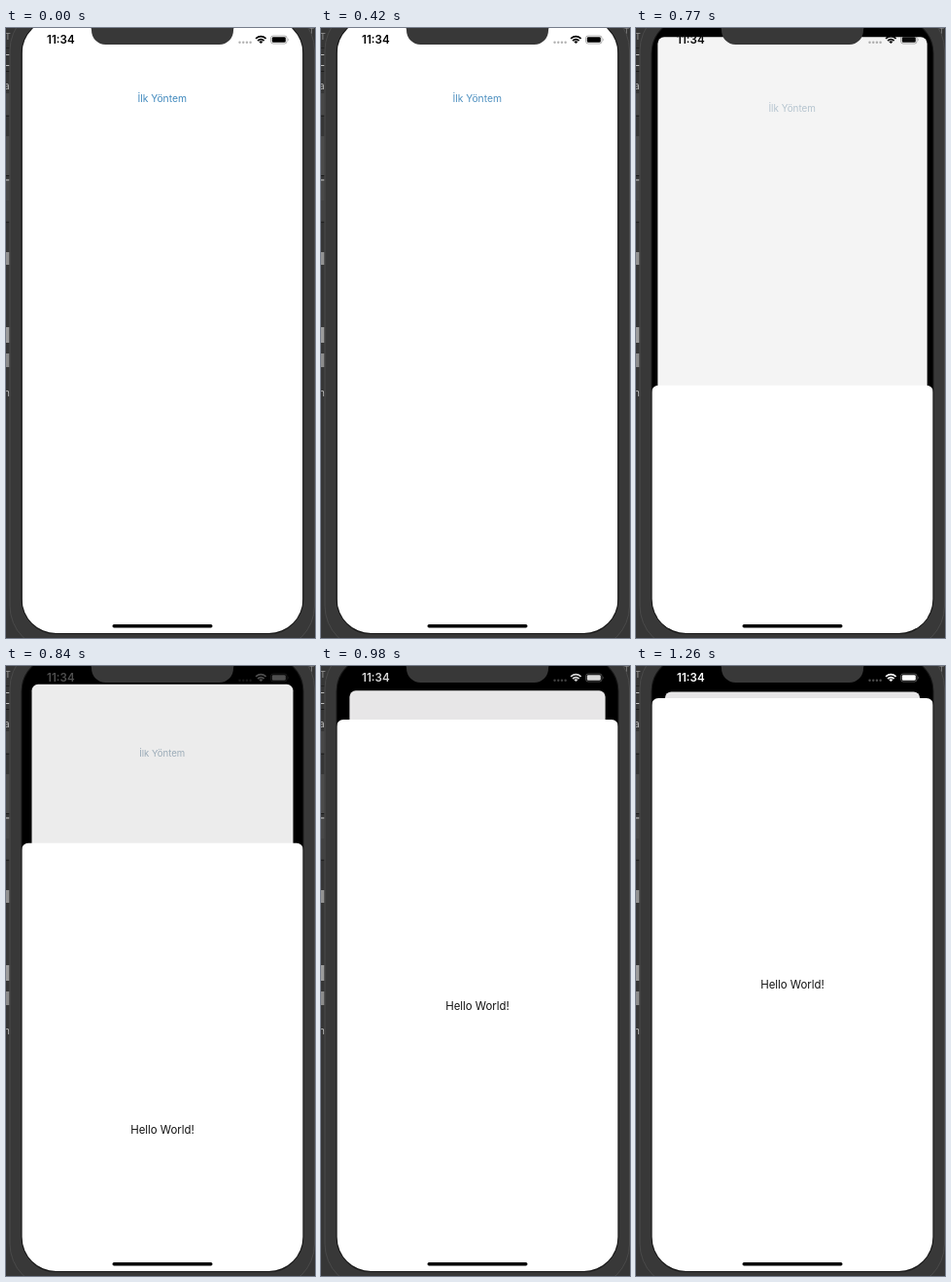
These frames come from a looping animation (318 by 626 pixels, 1.4 s). An HTML page:

```html
<!DOCTYPE html>
<html lang="en">
<head>
<meta charset="utf-8">
<style>
html, body { margin: 0; width: 100%; height: 100%; overflow: hidden; background: #363636; }
svg { display: block; font-family: Inter, "Liberation Sans", sans-serif; }
</style>
</head>
<body>
<svg width="318" height="626" viewBox="0 0 318 626">
  <defs>
    <clipPath id="glass"><rect x="16.6" y="-9" width="288.8" height="630" rx="35"/></clipPath>
  </defs>

  <!-- desktop behind the phone -->
  <g id="desk">
    <rect width="318" height="626" fill="#363636"/>
    <text x="-1" y="12" font-size="9" fill="#999">T</text>
    <text x="-2" y="63" font-size="10" fill="#bbb">a</text>
    <text x="-2" y="378" font-size="10" fill="#bbb">n</text>
    <text x="312" y="6" font-size="8" fill="#888">T</text>
  </g>

  <!-- phone body -->
  <rect x="4" y="-22" width="313.5" height="660" rx="45" fill="#383838" stroke="#4a4a4a"/>
  <rect x="16.6" y="-9" width="288.8" height="630" rx="35" stroke="#161616" stroke-width="2"/>

  <g clip-path="url(#glass)">
    <rect width="318" height="626" fill="#000"/>
    <g id="card">
      <rect id="page" x="16.6" y="-9" width="288.8" height="632" fill="#fff"/>
      <text id="button" x="160.7" y="75.9" font-size="10.3" text-anchor="middle">İlk Yöntem</text>
    </g>
    <g id="status">
      <text x="42" y="16" font-size="11.6" font-weight="600">11:34</text>
      <g opacity=".3">
        <circle cx="240.5" cy="14.7" r="1.2"/><circle cx="244.2" cy="14.7" r="1.2"/>
        <circle cx="247.9" cy="14.7" r="1.2"/><circle cx="251.6" cy="14.7" r="1.2"/>
      </g>
      <path d="M257 10.8Q262.3 6.4 267.6 10.8M259 13Q262.3 10.2 265.6 13" fill="none" stroke="currentColor" stroke-width="1.7"/>
      <path d="M260.2 14Q262.3 12.5 264.4 14L262.3 16Z"/>
      <rect x="272.6" y="8" width="16.4" height="8" rx="2.3" fill="none" stroke="currentColor" stroke-width=".8" opacity=".4"/>
      <rect x="273.8" y="9.2" width="14" height="5.6" rx="1.3"/>
      <path d="M290 10.6q1.5 1.4 0 2.8z" opacity=".4"/>
    </g>
    <g id="sheet">
      <rect x="16" width="290" height="640" rx="7" fill="#fff"/>
      <text x="161" y="297.8" font-size="11.4" text-anchor="middle" fill="#111">Hello World!</text>
    </g>
    <rect x="109.5" y="612" width="103" height="3.4" rx="1.7"/>
  </g>
  <path d="M84 -2Q88 -2 88 2.5A14.5 14.5 0 0 0 102.5 17H219.5A14.5 14.5 0 0 0 234 2.5Q234 -2 238 -2Z" fill="#383838"/>
</svg>
<script>
const $ = id => document.getElementById(id);
const clamp = x => Math.min(1, Math.max(0, x));
const mix = (a, b, k) => a + (b - a) * k;
const rgb = (a, b, k) => `rgb(${a.map((v, i) => Math.round(mix(v, b[i], k)))})`;

// y, height, colour of the window slivers at the left edge
const slivers = [
  [20, 1, '#222'], [27, 1, '#bbb'], [38, 1, '#bbb'], [44, 1, '#1c1c1c'], [67, 22, '#474747'],
  [90, 1, '#222'], [111, 40, '#4b4b4b'], [151, 1, '#1c1c1c'], [155, 2, '#888'], [157, 20, '#484848'],
  [177, 21, '#424242'], [199, 1, '#222'], [230, 13, '#929292'], [307, 16, '#9c9c9c'], [334, 14, '#8c8c8c']
];
$('desk').insertAdjacentHTML('beforeend', slivers.map(([y, h, c]) =>
  `<rect y="${y}" width="3.5" height="${h}" fill="${c}"/>`).join(''));

const LOOP = 1400, STEP = 70, START = 684.5, TOP = -4;

function draw(now) {
  const t = Math.min(1260, Math.floor(now % LOOP / STEP) * STEP);

  // critically damped spring
  const w = 0.0172 * Math.max(0, t - START);
  const p = 1 - (1 + w) * Math.exp(-w);

  $('sheet').setAttribute('transform', `translate(0 ${mix(621, 32.7, p)})`);

  const s = mix(1, 0.908, p), y = mix(TOP, 26.5, p);
  $('card').setAttribute('transform', `translate(161 ${y}) scale(${s}) translate(-161 ${-TOP})`);
  $('page').setAttribute('y', p ? TOP : -9);
  $('page').setAttribute('rx', p ? 7 : 0);
  $('page').setAttribute('fill', rgb([255, 255, 255], [230, 229, 230], p));

  const press = clamp((t - 410) / 150), release = clamp((t - 700) / 200);
  $('button').setAttribute('fill', rgb([66, 138, 190], [160, 160, 160], Math.max(0.6 * press, release)));
  $('button').setAttribute('opacity', mix(1, 0.25, press) + 0.75 * release);

  const light = clamp((t - 760) / 260);
  const ink = rgb([0, 0, 0], [255, 255, 255], light);
  $('status').setAttribute('fill', ink);
  $('status').setAttribute('color', ink);
}

const t0 = performance.now();
function tick() {
  draw(performance.now() - t0);
  requestAnimationFrame(tick);
}
tick();
</script>
</body>
</html>
```
